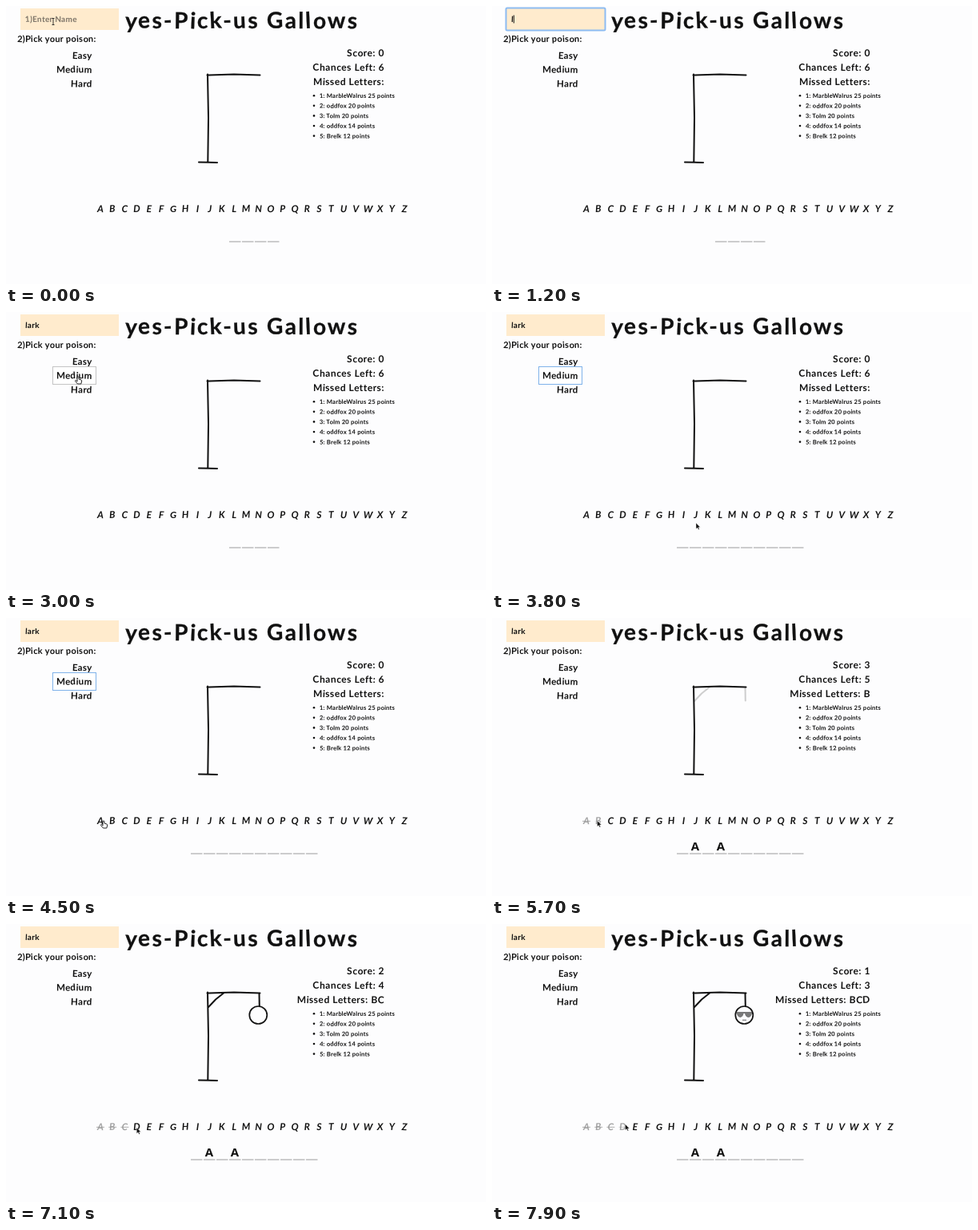
An HTML page for the animation above (8 s loop, 600 px wide and 348 px high).

```html
<!DOCTYPE html>
<html lang="en">
<head>
<meta charset="utf-8">
<title>Word game</title>
<style>
  html, body { margin: 0; width: 100%; height: 100%; overflow: hidden; background: #fdfdfe; }
  svg { display: block; width: 600px; height: 348px; }
  text { font-family: Lato, "Open Sans", sans-serif; font-weight: 700; fill: #111; letter-spacing: .3px; }
  .title { font-size: 28px; letter-spacing: 2.3px; stroke: #111; stroke-width: .3; }
  .label { font-size: 11px; }
  .field { font-size: 10px; }
  .level { font-size: 11.6px; }
  .stat { font-size: 12px; letter-spacing: .5px; }
  .rank { font-size: 7.6px; letter-spacing: .2px; }
  .key { font-size: 12px; font-style: italic; }
  .guess { font: 700 15px "Open Sans", "Noto Sans", sans-serif; letter-spacing: 0; }
  .ink { fill: none; stroke: #111; stroke-width: 2; stroke-linecap: round; stroke-linejoin: round; }
</style>
</head>
<body>
<svg id="stage" viewBox="0 0 600 348"></svg>
<script>
const LOOP = 8000, STEP = 100;
const stage = document.getElementById('stage');

let seed = 7;
const random = () => (seed = seed * 16807 % 2147483647) / 2147483647;

function add(tag, attrs, parent = stage) {
  const node = document.createElementNS('http://www.w3.org/2000/svg', tag);
  for (const name in attrs) node.setAttribute(name, attrs[name]);
  parent.append(node);
  return node;
}

// Each letter leans a little, as if written with a marker.
function write(content, x, y, kind, anchor = 'start') {
  const lean = Array.from({ length: 24 }, () => (random() * 7 - 4).toFixed(1)).join(' ');
  const node = add('text', { x, y, class: kind, 'text-anchor': anchor, rotate: lean });
  node.textContent = content;
  return node;
}

const ink = (d, parent) => add('path', { d, class: 'ink' }, parent);
const show = (node, visible) => node.setAttribute('opacity', +visible);
const setText = (node, value) => { if (node.textContent !== value) node.textContent = value; };

// Name field
add('rect', { x: 18, y: 3, width: 123, height: 27, fill: '#ffebcd' });
const ring = add('rect', { x: 17.5, y: 2.5, width: 124, height: 28, rx: 1.5, fill: 'none', stroke: '#8dbcf2', 'stroke-width': 2 });
const hint = write('1)Enter Name', 24, 20, 'field');
hint.style.fill = '#7d7468';
const typed = write('', 24, 20, 'field');
const caret = add('rect', { y: 11.5, width: 1, height: 10, fill: '#111' });

// Headings and levels
write('yes-Pick-us Gallows', 295, 28, 'title', 'middle');
write('2)Pick your poison:', 14, 45, 'label');
const frame = add('rect', { x: 58.5, y: 68.5, width: 54, height: 22, fill: '#fff' });
['Easy', 'Medium', 'Hard'].forEach((name, i) => write(name, 107.5, 66 + 17.6 * i, 'level', 'end'));

// Scores
const [score, chances, missed] = [63, 81, 99].map(y => write('', 473, y, 'stat', 'end'));
['MarbleWalrus 25', 'oddfox 20', 'Tolm 20', 'oddfox 14', 'Brelk 12'].forEach((entry, i) => {
  const y = 115 + 12.6 * i;
  add('circle', { cx: 385, cy: y - 2.8, r: 1.3, fill: '#111' });
  write(`${i + 1}: ${entry} points`, 392, y, 'rank');
});

// Gallows and figure
ink('M252 85.5 L253 140 252.3 195.5 M241 195.5 L264 196 M251.5 86.5 L285 85.6 317.5 86.5');
const rope = add('g', {});
ink('M253 104 L262 94.5 272 86.5 M316.5 87 L316.8 103.5', rope);
const head = add('g', {});
add('circle', { cx: 315.3, cy: 114, r: 11, fill: '#fdfdfe', stroke: '#111', 'stroke-width': 1.7 }, head);
const shades = add('g', {});
add('path', { d: 'M305.5 110 H325 V112 Q324 117 320 117 Q316.7 116 316 112 H314.5 Q314 116 310.5 117 Q306.5 117 305.5 110Z', fill: '#222' }, shades);
add('path', { d: 'M313 120.3 H318', stroke: '#222', 'stroke-width': 1.2 }, shades);

// Keyboard
const keys = [...'ABCDEFGHIJKLMNOPQRSTUVWXYZ'].map((letter, i) => {
  const x = 118 + 15.2 * i;
  const node = write(letter, x, 258, 'key', 'middle');
  const strike = add('path', { d: `M${x - 5} 254.3 h10`, stroke: '#999', 'stroke-width': 1 });
  return { node, strike };
});

// Secret word
const blanks = (count, left) => add('path', {
  d: Array.from({ length: count }, (_, i) => `M${left + 16 * i} 295 h14.5`).join(''),
  stroke: '#bdbdbd', 'stroke-width': 1.3
});
const shortWord = blanks(4, 279), longWord = blanks(10, 231);
const guesses = [254, 286].map(x => {
  const node = add('text', { x, y: 291, class: 'guess', 'text-anchor': 'middle' });
  node.textContent = 'A';
  return node;
});

// Pointers, each with its hot spot at the origin
const pointers = {
  beam: add('path', { d: 'M-1.5 -4 H1.5 M0 -4 V4 M-1.5 4 H1.5', stroke: '#222', 'stroke-width': .9 }),
  hand: add('path', {
    d: 'M-1 -3.5 Q0 -4.7 1 -3.5 V-1 L4 0 Q5 .5 4.6 2 L3.8 5 H-.5 L-3.5 1.5 Q-3.5 .2 -2.4 .7 L-1 2Z',
    fill: '#fff', stroke: '#111', 'stroke-width': .9, 'stroke-linejoin': 'round'
  }),
  arrow: add('path', { d: 'M0 0 V7.5 L1.8 6 3 8.6 4.2 8 3.1 5.6 H5.3Z', fill: '#111', stroke: '#fff', 'stroke-width': .4 })
};

// time, x, y, pointer shown from then on
const route = [
  [0, 59, 19.5, 'beam'], [1200, 59, 19.5, ''], [2300, 59, 19.5, 'beam'],
  [2500, 106, 38, 'arrow'], [2800, 90, 85, 'hand'], [3400, 90, 85, 'hand'],
  [3500, 118, 120, 'arrow'], [3800, 255, 264, 'arrow'], [4000, 238, 265, 'arrow'],
  [4400, 122, 258, 'hand'], [4700, 122, 258, 'arrow'], [4800, 122, 258, 'arrow'],
  [5000, 133, 257, 'hand'], [5700, 131.5, 253.5, 'arrow'], [5900, 132, 254, 'arrow'],
  [6300, 152.5, 257, 'hand'], [6700, 152, 254, 'arrow'], [6800, 152, 254, 'arrow'],
  [7200, 167, 255, 'hand'], [7700, 166.5, 250.5, 'arrow'], [8000, 166.5, 250.5, 'arrow']
];
const clicks = [4700, 5700, 6700, 7700];
const typing = [[1200, 'l'], [1400, 'la'], [1500, 'lar'], [1700, 'lark']];

const fade = (t, start) => Math.min(1, Math.max(0, (t - start + 100) / 500));

function movePointer(t) {
  const i = route.findLastIndex(stop => stop[0] <= t);
  const [t0, x0, y0, kind] = route[i];
  const [t1, x1, y1, next] = route[i + 1];
  // A click changes the pointer in place; otherwise it glides on.
  const still = clicks.includes(t1) || next === '';
  const p = still ? 0 : (t - t0) / (t1 - t0);
  for (const name in pointers) show(pointers[name], name === kind);
  if (kind) pointers[kind].setAttribute('transform', `translate(${x0 + (x1 - x0) * p} ${y0 + (y1 - y0) * p})`);
}

function draw(t) {
  const text = (typing.findLast(step => step[0] <= t) || [0, ''])[1];
  setText(typed, text);
  show(hint, !text);
  const focused = t >= 200 && t < 3000;
  show(ring, focused);
  show(caret, focused && !(t >= 700 && t < 1000) && !(t >= 2100 && t < 2500));
  caret.setAttribute('x', 24 + (text ? typed.getComputedTextLength() : 0));

  show(frame, t >= 2800 && t < clicks[0]);
  frame.setAttribute('stroke', t < 3500 ? '#c4c4c4' : '#7fb2ea');

  const found = t >= clicks[0];
  const misses = clicks.slice(1).filter(time => t >= time).length;
  setText(score, `Score: ${found ? 4 - misses : 0}`);
  setText(chances, `Chances Left: ${6 - misses}`);
  setText(missed, `Missed Letters:${misses ? ' ' + 'BCD'.slice(0, misses) : ''}`);

  [rope, head, shades].forEach((part, i) => show(part, t >= clicks[i + 1] ? fade(t, clicks[i + 1]) : 0));
  show(shortWord, t < 3200);
  show(longWord, t >= 3200);
  guesses.forEach(node => show(node, found));

  keys.forEach(({ node, strike }, i) => {
    const used = t >= clicks[i];
    node.setAttribute('opacity', used ? .38 : 1);
    strike.setAttribute('opacity', used ? .8 * fade(t, clicks[i]) : 0);
  });
  movePointer(t);
}

const start = performance.now();
function tick() {
  const t = (performance.now() - start) % LOOP;
  draw(Math.floor(t / STEP) * STEP);
  requestAnimationFrame(tick);
}
tick();
</script>
</body>
</html>
```
